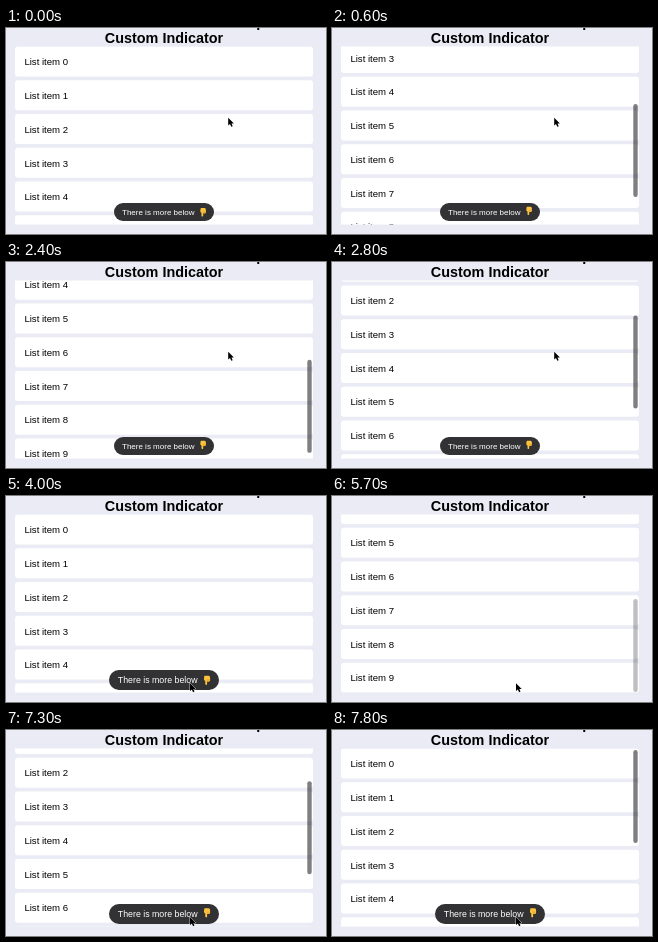
These frames come from a looping animation (320 by 206 pixels, 8000 ms). An HTML page:

```html
<!DOCTYPE html>
<html lang="en">
<head>
<meta charset="utf-8">
<title>Custom Indicator</title>
<style>
  html, body { margin: 0; width: 100%; height: 100%; overflow: hidden; background: #ebebf5; }
  svg { display: block; width: 100%; height: 100%; }
  text { font-family: "Liberation Sans", Arial, sans-serif; }
  .title { font-size: 14.4px; font-weight: bold; }
  .item { font-size: 9.6px; }
  .hint { font-size: 8px; fill: #fff; }
</style>
</head>
<body>
<svg viewBox="0 0 320 206">
  <clipPath id="view"><rect x="9" y="18.6" width="298" height="178"/></clipPath>
  <text class="title" x="250.2" y="-1.3">p</text>
  <text class="title" x="158" y="15.3" text-anchor="middle">Custom Indicator</text>
  <g clip-path="url(#view)"><g id="list"></g></g>
  <rect id="thumb" x="301.3" width="4.4" height="93" rx="2.2" fill="#000"/>
  <g id="pill">
    <rect x="-50" y="-9" width="100" height="18" rx="9" fill="#323234"/>
    <text class="hint" x="-42" y="2.8">There is more below</text>
    <g id="hand" fill="#fcc33c">
      <path d="M36.6 -3.6Q36.6 -4.2 37.2 -4.2H40.6Q41.8 -4 41.9 -2.6V.2Q41.7 1.3 40.6 1.2L39.2 1V3.6Q38.4 4.8 37.5 3.6V.6Q36.4 .2 36.3 -1Z"/>
      <path d="M39.3 -1.2V.9M40.6 -1.2V1" fill="none" stroke="#d68a20" stroke-width=".4"/>
    </g>
  </g>
  <path id="cursor" d="M0 0V7.8L1.8 6.2 3.1 9 4.5 8.4 3.3 5.7H5.7Z" stroke="#fff" stroke-width=".7" paint-order="stroke"/>
</svg>
<script>
const LOOP = 8000, STEP = 100, PITCH = 33.75, MAX_SCROLL = 155.6;
const $ = id => document.getElementById(id);
const move = (id, x, y, scale = 1) =>
  $(id).setAttribute("transform", `translate(${x} ${y}) scale(${scale})`);

const progress = (t, from, to) => Math.min(1, Math.max(0, (t - from) / (to - from)));
const smooth = u => u * u * (3 - 2 * u);
// A flick: quick build-up, then a decay whose length depends on the power.
const flick = (u, power) => 1 - (1 - u ** 1.5) ** power;

$("list").innerHTML = Array.from({ length: 10 }, (_, i) => {
  const y = 18.6 + i * PITCH;
  return `<rect x="9" y="${y}" width="298" height="30" rx="3" fill="#fff"/>
    <text class="item" x="18.4" y="${y + 18.7}">List item ${i}</text>`;
}).join("");

function scrollAt(t) {
  if (t < 2300) return MAX_SCROLL * flick(progress(t, 0, 1600), 4.3);
  if (t < 4300) return MAX_SCROLL * (1 - flick(progress(t, 2300, 3200), 1.7));
  if (t < 6700) return MAX_SCROLL * smooth(progress(t, 4300, 5100));
  return MAX_SCROLL * (1 - flick(progress(t, 6700, 7800), 1.9));
}

// Scrollbar shows from a first scroll step, is half faded, then gone.
const bars = [[100, 2000], [2400, 3700], [4400, 5700], [6800, LOOP]];
function barOpacity(t) {
  const bar = bars.find(([from, fade]) => t >= from && t < fade + STEP);
  return !bar ? 0 : t < bar[1] ? 0.5 : 0.25;
}

function draw(now) {
  const t = Math.floor((now % LOOP) / STEP) * STEP;
  const scroll = scrollAt(t);
  move("list", 0, -scroll);
  $("thumb").setAttribute("y", 20 + 83 * scroll / MAX_SCROLL);
  $("thumb").setAttribute("opacity", barOpacity(t));

  const travel = smooth(progress(t, 3200, 3900));
  move("cursor", 222.2 - 38.2 * travel, 89.8 + 97.4 * travel);

  const phase = t % 1000;
  move("pill", 158, 184, 1 + 0.1 * smooth(progress(t, 3700, 3900)));
  $("pill").setAttribute("visibility", scroll < 154.5 ? "visible" : "hidden");
  move("hand", 0, phase >= 200 ? -1.1 : 0.3);
}

const start = performance.now();
function tick() {
  draw(performance.now() - start);
  requestAnimationFrame(tick);
}
tick();
</script>
</body>
</html>
```
